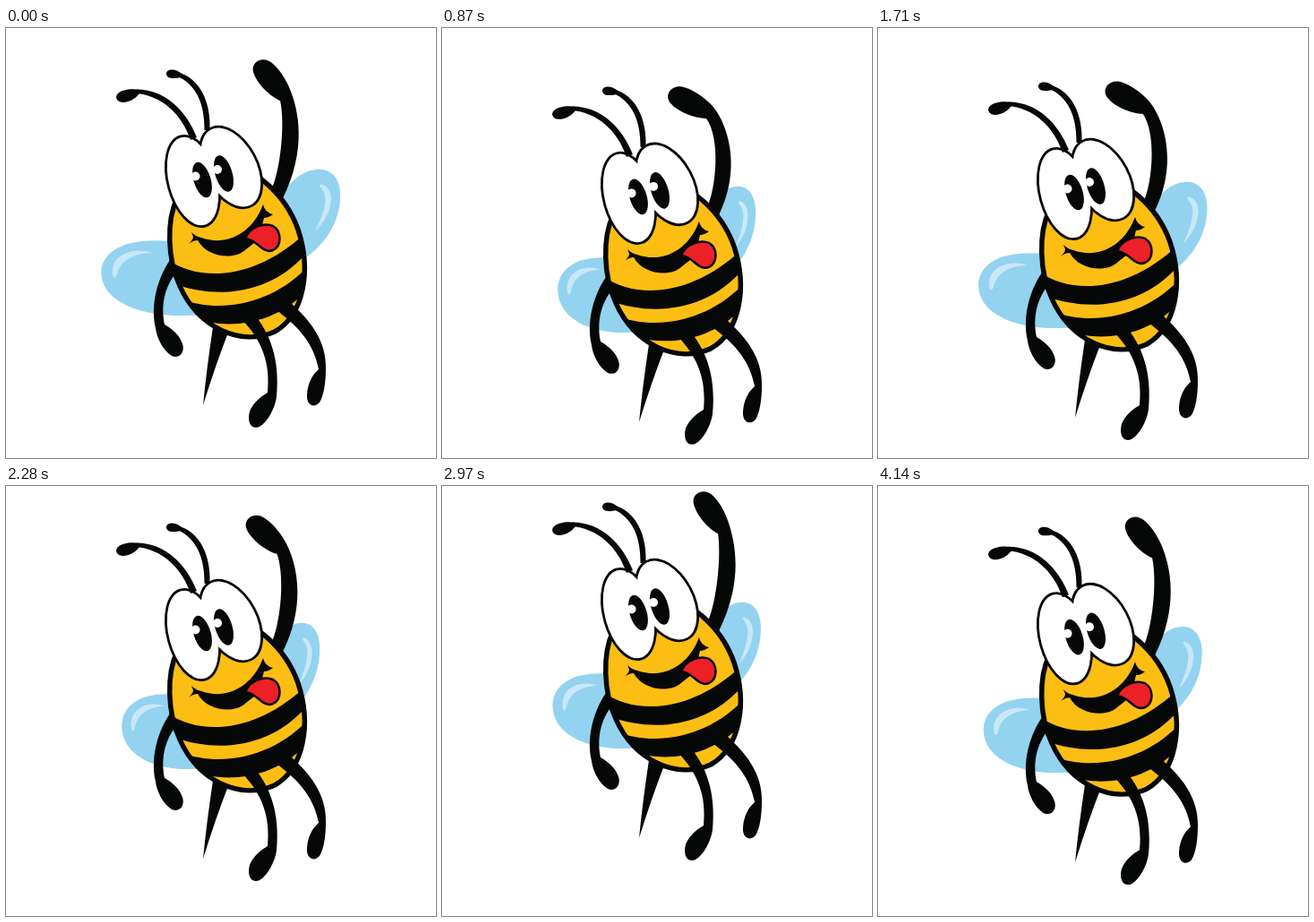
Animation, 480 px wide and 480 px high, one loop 4170 ms. Source, as an HTML page:

```html
<!DOCTYPE html>
<html lang="en">
<head>
<meta charset="utf-8">
<title>Waving bee</title>
<style>
  html, body { margin: 0; width: 100%; height: 100%; overflow: hidden; background: #fff; }
  svg { display: block; width: 100vw; height: 100vh; }
  .ink { fill: #060808; }
  .line { fill: none; stroke: #060808; }
  .wing { fill: #93d3f0; }
  .shine { fill: #c8e8f9; }
  .white { fill: #fff; }
</style>
</head>
<body>
<svg viewBox="0 0 480 480">
  <defs>
    <path id="egg" d="M240 150C275 153 312 185 326 225C341 270 333 320 300 339C262 356 215 335 194 288C180 258 179 215 191 190C200 165 215 150 240 150Z"/>
    <clipPath id="inside"><use href="#egg"/></clipPath>
    <ellipse id="eyeL" cx="208.500" cy="171" rx="26.500" ry="50.500" transform="rotate(-15 208.500 171)"/>
    <ellipse id="eyeR" cx="251" cy="155.500" rx="28" ry="47.500" transform="rotate(-28 251 155.500)"/>
  </defs>
  <g id="bee">
    <g id="wings">
      <path class="wing" d="M225 245C185 235 145 234 124 246C106 256 102 273 111 290C122 309 155 322 200 321L230 320Z"/>
      <path class="shine" d="M120 278C113 256 140 243 163 251C143 251 127 260 124 275Q122 280 120 278Z"/>
      <path class="wing" d="M295 204C312 175 328 160 346 158C366 156 375 172 373 192C371 222 352 245 332 258L290 260Z"/>
      <path class="shine" d="M350 175C356 173 366 182 362 198C360 210 352 220 345 227C352 213 358 197 356 187C355 181 351 179 350 175Z"/>
    </g>

    <path class="ink" d="M231 334L248 340Q234 376 220 421Q224 380 231 334Z"/>
    <path class="ink" d="M190 250C172 270 160 305 167 335C168 345 175 360 185 366C195 370 201 360 196 350C192 340 182 334 177 331C173 310 176 290 192 270Z"/>
    <path id="arm" class="ink"/>

    <use href="#egg" fill="#fdbe13"/>
    <g class="ink" clip-path="url(#inside)">
      <path d="M178 257C215 285 280 281 336 227L338 248C300 295 240 305 186 285Z"/>
      <path d="M194 302C240 320 300 308 340 263L340 288C305 331 250 337 213 325Z"/>
    </g>
    <use href="#egg" class="line" stroke-width="5.500"/>

    <path class="ink" d="M275 317C295 340 306 370 302 412C300 425 292 440 283 445C273 449 269 439 272 428C276 418 285 411 292 407C295 375 287 350 263 325Z"/>
    <path class="ink" d="M312 302C340 325 358 350 357 380C357 395 355 410 350 418C344 425 335 421 336 409C337 396 342 387 349 381C344 355 330 335 299 313Z"/>

    <path class="ink" d="M207 228Q212 233 218 234C246 244 272 229 284 204L287 197Q289 206 298 208Q293 212 288 212L282 236L268 247C255 260 224 256 214 237Q209 237 204 241Q209 236 209 233Z"/>
    <path d="M267 235C272 222 288 217 298 221C308 227 308 243 298 248C286 253 281 236 267 235Z" fill="#ec2027" stroke="#060808" stroke-width="2.500"/>

    <g class="line" stroke-width="5.500">
      <use href="#eyeL"/><use href="#eyeR"/>
    </g>
    <g class="white" stroke="#060808" stroke-width="0">
      <use href="#eyeL" id="whiteL"/><use href="#eyeR"/>
    </g>
    <g class="ink">
      <ellipse cx="219" cy="169.500" rx="9.500" ry="20.500" transform="rotate(-17 219 169.500)"/>
      <ellipse cx="243" cy="162.500" rx="9.500" ry="21" transform="rotate(-17 243 162.500)"/>
    </g>
    <circle class="white" cx="211.500" cy="165.500" r="5"/>
    <circle class="white" cx="236" cy="158" r="5"/>

    <g class="ink">
      <path d="M146 68.500C178 69 201 92 213 122L206 125C196 96 174 75 144 73Z"/>
      <path d="M149 69C140 67 124 69 123 77C124 86 140 85 149 73Z"/>
      <path d="M192 49.500C216 56 229 82 227.500 114L221.500 114C222 85 212 62 190 53.500Z"/>
      <path d="M196 51C188 44 178 46 179 52C181 58 190 56 196 55Z"/>
    </g>
  </g>
</svg>
<script>
  const LOOP = 4170, STEP = 30;
  // [time in ms, value] pairs, joined by straight lines
  const bob = [[0, 0], [1290, 28], [3030, -30], [LOOP, 0]];
  const wave = [[0, 0], [450, -1.5], [850, -25], [1240, 4], [1680, -24],
                [2130, 5], [2490, -25], [2840, 5], [LOOP, 0]];
  const flap = [[0, 1], [120, 0.828], [150, 0.828], [240, 1]];

  function at(keys, t) {
    const i = keys.findIndex(k => k[0] > t);
    const [t0, v0] = keys[i - 1], [t1, v1] = keys[i];
    return v0 + (v1 - v0) * (t - t0) / (t1 - t0);
  }

  // The shoulder stays put; the hand turns about the elbow and the arm bends after it.
  function armPath(degrees) {
    const a = degrees * Math.PI / 180, c = Math.cos(a), s = Math.sin(a);
    const turn = (x, y) => {
      const dx = x - 303, dy = y - 108;
      return `${303 + dx * c - dy * s} ${108 + dx * s + dy * c} `;
    };
    return "M296 181C306 160 " + turn(312, 108) + turn(306, 81) +
      "C" + turn(296, 77) + turn(280, 63) + turn(276, 49) +
      "C" + turn(273, 37) + turn(288, 30) + turn(298, 40) +
      "C" + turn(306, 47) + turn(312, 57) + turn(316, 66) +
      "C" + turn(327, 91) + "336 136 309 190Z";
  }

  const [bee, wings, arm] = ["bee", "wings", "arm"].map(id => document.getElementById(id));
  const start = performance.now();

  function draw() {
    const elapsed = Math.max(0, performance.now() - start) % LOOP;
    const t = Math.floor(elapsed / STEP) * STEP;
    bee.setAttribute("transform", `translate(0 ${at(bob, t)})`);
    wings.setAttribute("transform", `translate(239.5 0) scale(${at(flap, t % 240)} 1) translate(-239.5 0)`);
    arm.setAttribute("d", armPath(at(wave, t)));
    requestAnimationFrame(draw);
  }
  draw();
</script>
</body>
</html>
```
